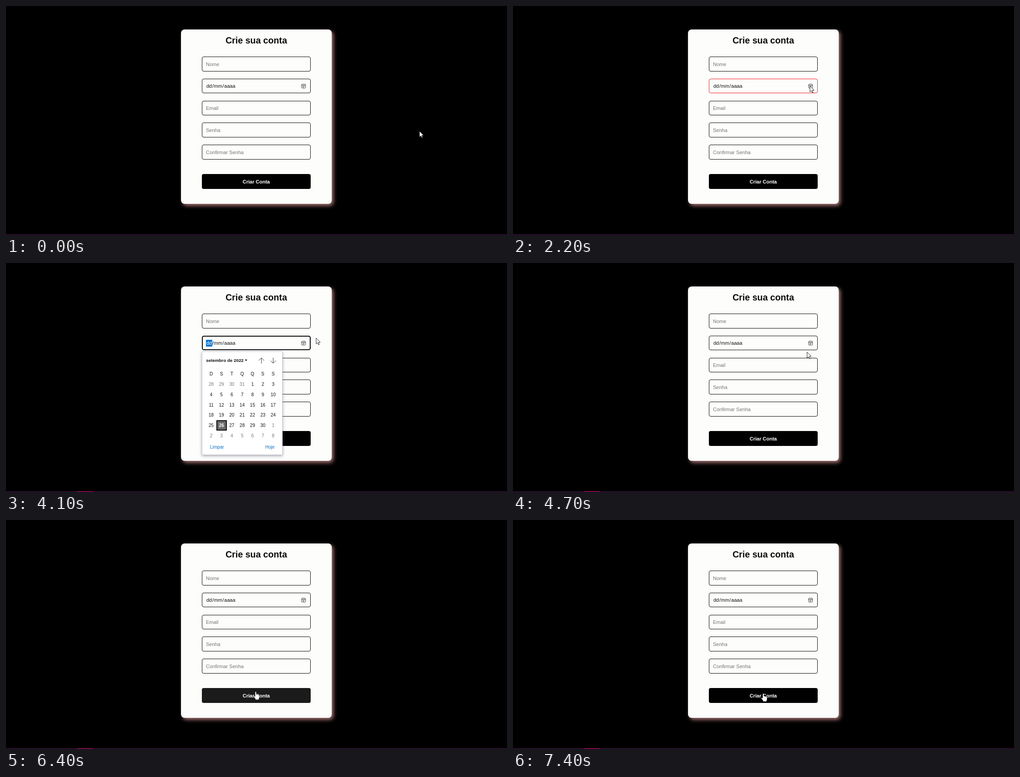
An HTML page that plays this animation: 1105x507 px, repeating every 8 s.

```html
<!DOCTYPE html>
<html lang="pt-BR">
<head>
<meta charset="utf-8">
<title>Crie sua conta</title>
<style>
  html, body { margin: 0; width: 100%; height: 100%; overflow: hidden; background: #000; }
  svg { display: block; width: 100%; height: 100%; }
  text { font: 11px "Liberation Sans", Arial, sans-serif; white-space: pre; }
  .mid { text-anchor: middle; }
  .bold { font-weight: bold; }
  .small { font-size: 10px; }
</style>
</head>
<body>
<svg viewBox="0 0 1105 507" xmlns="http://www.w3.org/2000/svg">
  <defs>
    <filter id="glow" x="-20%" y="-20%" width="140%" height="140%"><feGaussianBlur stdDeviation="4"/></filter>
    <filter id="soft" x="-20%" y="-20%" width="140%" height="140%"><feGaussianBlur stdDeviation="3"/></filter>
  </defs>
  <rect width="1105" height="507" fill="#000"/>
  <rect y="505" width="1105" height="2" fill="#2c0c30"/>
  <rect id="task" x="156" y="505" width="36" height="2" fill="#85084f"/>
  <rect x="390" y="56" width="332" height="386" rx="8" fill="#a87474" filter="url(#glow)"/>
  <rect x="386" y="52" width="332.5" height="386" rx="8" fill="#fdfdfc"/>
  <text class="mid bold" x="552" y="83" style="font-size:19.7px" fill="#0a0a0a">Crie sua conta</text>
  <g id="fields"></g>

  <rect id="pick" x="441" y="170" width="14" height="15" fill="#0b74d1"/>
  <g fill="#111">
    <text id="day" x="442" y="181">dd</text>
    <text x="455" y="181">/</text>
    <text x="458.5" y="181">mm</text>
    <text x="477.5" y="181">/</text>
    <text x="481.3" y="181">aaaa</text>
  </g>
  <g fill="none" stroke="#3c3c46">
    <rect x="651.9" y="173" width="8.8" height="8.8" rx="1.6"/>
    <path d="M652 175.5h8.6M654 177.7h5M654 179.7h3"/>
  </g>

  <rect id="button" x="432" y="372" width="240" height="33" rx="4"/>
  <text class="mid bold" x="552" y="393" fill="#fff">Criar Conta</text>

  <g id="popup">
    <rect x="432" y="198" width="178" height="229" fill="#555a70" opacity=".55" filter="url(#soft)"/>
    <rect x="432.5" y="196.5" width="177" height="228" fill="#fff" stroke="#d2d2d6"/>
    <text class="bold" x="441.3" y="219" style="font-size:9.8px" fill="#111">setembro de 2022</text>
    <path d="M526.6 213.8h5.6l-2.8 3.3z" fill="#111"/>
    <path d="M563.3 222.5v-12.5m-6 6l6-6 6 6M589.3 209.5v12.5m-6-6l6 6 6-6" fill="none" stroke="#333"/>
    <rect x="465" y="349" width="21" height="21" fill="#6b6b6b" stroke="#0a0a0a" stroke-width="2"/>
    <g id="days"></g>
    <text class="small" x="450" y="411" fill="#0b6fc8">Limpar</text>
    <text class="small" x="571.7" y="411" fill="#0b6fc8">Hoje</text>
  </g>

  <g id="cursor" stroke-linejoin="round">
    <path id="arrow" d="M0 0V13.2L3 10.4 5.1 15 7.1 14.1 5 9.7H9.2Z" fill="#fff" stroke="#111" stroke-width=".9"/>
    <path id="beam" d="M-3 -6.5H-.7L0 -6 .7 -6.5H3M0 -6V6M-3 6.5H-.7L0 6 .7 6.5H3" fill="none" stroke="#111" stroke-width="1.1"/>
    <path id="hand" d="M-1.8 1.2Q-1.6 0 -.3 0Q1.2 0 1.2 1.5V6Q2.6 5.2 3.6 6.4Q5 5.8 5.8 7.1Q8 6.8 8 9V12.5Q8 14.5 6.8 16V18H-.8V16.5L-4.6 11.5Q-5.4 10 -4 9.4Q-3 9.2 -1.8 10.6Z" fill="#fff" stroke="#111" stroke-width=".8"/>
  </g>
</svg>
<script>
const LOOP = 8000, STEP = 100;
const $ = id => document.getElementById(id);

function add(parent, tag, attrs, text) {
  const el = document.createElementNS("http://www.w3.org/2000/svg", tag);
  for (const key in attrs) el.setAttribute(key, attrs[key]);
  if (text !== undefined) el.textContent = text;
  return parent.appendChild(el);
}

// Form fields: top, height, placeholder
const fields = [
  [112, 33, "Nome"], [161, 32, ""], [210, 32, "Email"], [258, 33, "Senha"], [307, 33, "Confirmar Senha"]
].map(([y, h, label], i) => {
  const box = add($("fields"), "rect", { rx: 3.5, fill: "#fdfdfc" });
  add($("fields"), "text", { x: 441, y: [133, 181, 230, 279, 328][i], fill: "#757575" }, label);
  return { y, h, box };
});
const DATE = 1;

// Month grid, starting on 28 August
const colX = c => 452.6 + 22.77 * c;
[..."DSTQQSS"].forEach((d, c) => add($("days"), "text", { class: "mid small", x: colX(c), y: 249, fill: "#111" }, d));
for (let i = 0; i < 42; i++) {
  const n = i - 3, inside = n > 0 && n <= 30, today = n === 26;
  const label = n <= 0 ? n + 31 : n > 30 ? n - 30 : n;
  add($("days"), "text", {
    class: "mid small" + (today ? " bold" : ""),
    x: colX(i % 7), y: 272 + 22.8 * Math.floor(i / 7),
    fill: today ? "#fff" : inside ? "#111" : "#777"
  }, label);
}

// Pointer stops: time, x, y
const path = [
  [100, 912, 277], [800, 612, 131], [1100, 612, 131], [2000, 653, 175], [2200, 655, 177],
  [3800, 655, 177], [4100, 684, 166], [4400, 684, 166], [4900, 625, 218], [5000, 625, 218],
  [5200, 610, 235], [5300, 610, 235], [5600, 572, 283], [6200, 552, 363], [6400, 551, 380],
  [6800, 552.5, 384], [LOOP, 552.5, 384]
];

function pointer(t) {
  const k = path.findIndex(p => p[0] > t);
  if (k === 0) return path[0].slice(1);
  const [t0, x0, y0] = path[k - 1], [t1, x1, y1] = path[k];
  const u = (t - t0) / (t1 - t0);
  return [x0 + (x1 - x0) * u, y0 + (y1 - y0) * u];
}

const show = (id, on) => $(id).setAttribute("visibility", on ? "visible" : "hidden");
const between = (t, a, b) => t >= a && t < b;

function draw(now) {
  const t = Math.floor((now % LOOP) / STEP) * STEP;
  const [x, y] = pointer(t);
  const over = (top, h) => x >= 432 && x < 672 && y >= top && y < top + h;
  const focus = between(t, 2500, 4300);
  const onButton = over(372, 33);
  let hovered = -1;

  fields.forEach(({ y: top, h, box }, i) => {
    const hot = over(top, h);
    if (hot) hovered = i;
    const w = focus && i === DATE ? 2 : 1;
    const attrs = {
      x: 432 + w / 2, y: top + w / 2, width: 240 - w, height: h - w,
      "stroke-width": w, stroke: hot && w === 1 ? "#f01c1c" : "#0a0a0a"
    };
    for (const key in attrs) box.setAttribute(key, attrs[key]);
  });

  show("pick", focus);
  $("day").setAttribute("fill", focus ? "#fff" : "#111");
  show("popup", between(t, 2600, 3200) || between(t, 3400, 4300));
  show("task", t >= 2600);
  $("button").setAttribute("fill", onButton && t < 7400 ? "#1b1b1b" : "#000");

  const beam = hovered >= 0 && hovered !== DATE;
  show("beam", beam);
  show("hand", onButton);
  show("arrow", !beam && !onButton);
  $("cursor").setAttribute("transform", `translate(${x.toFixed(1)} ${y.toFixed(1)})`);
}

const start = performance.now();
function tick() {
  draw(performance.now() - start);
  requestAnimationFrame(tick);
}
draw(0);
requestAnimationFrame(tick);
</script>
</body>
</html>
```
